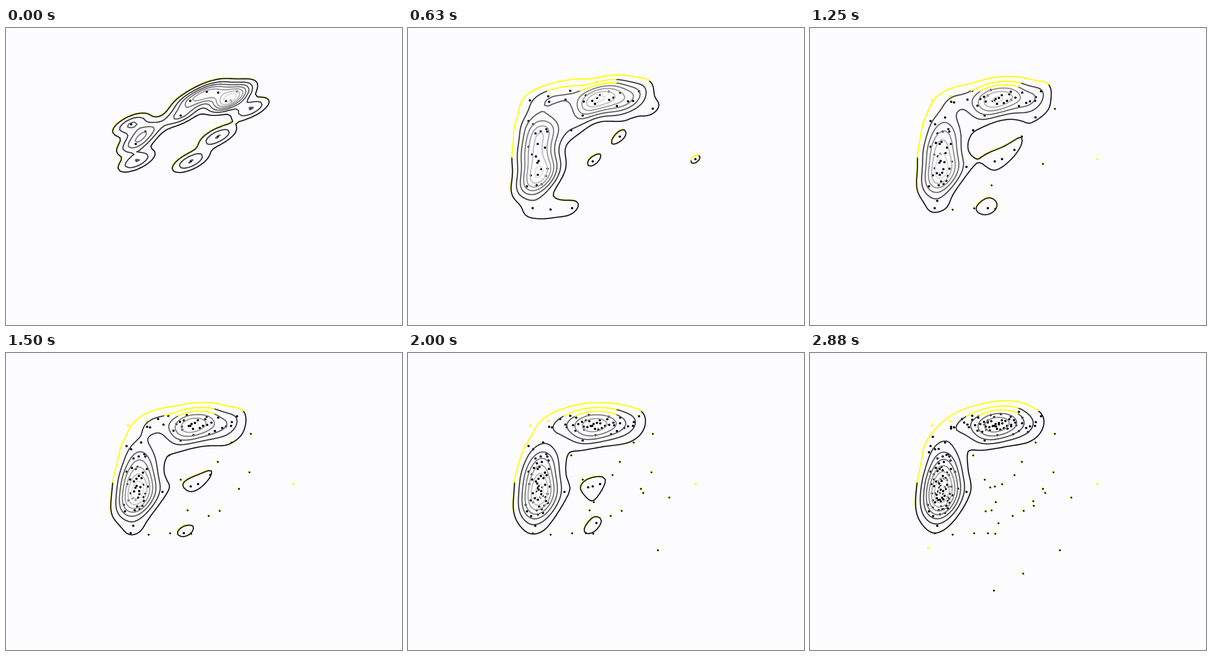
An HTML page with a canvas for the animation above (3010 ms loop, 864x648 px).

```html
<!DOCTYPE html>
<html lang="en">
<head>
<meta charset="utf-8">
<title>Growing density contours</title>
<style>
html, body { margin: 0; width: 100%; height: 100%; overflow: hidden; background: #fcfcff; }
canvas { display: block; width: 864px; height: 648px; }
</style>
</head>
<body>
<canvas id="stage" width="864" height="648"></canvas>
<script>
const ctx = document.getElementById('stage').getContext('2d');
const LOOP = 3010, STATES = 24, FIRST = 14, BATCH = 7;
const BANDWIDTH = 0.3, UNIT = 1.1e-6;
const X0 = 160, Y0 = 60, STEP = 6, COLS = 90, ROWS = 82;
const YELLOW = '#ffff00', BG = '#fcfcff';

// Key points in order of arrival: the opening set, then the scattered ones.
const keys = [
  [273, 210], [304, 226], [283, 253], [285, 290], [381, 191], [402, 159], [438, 139],
  [463, 141], [480, 160], [491, 159], [504, 138], [534, 176], [462, 237], [403, 291],
  [627, 286], [272, 393], [263, 203], [356, 223], [311, 396], [266, 158], [358, 393],
  [306, 149], [492, 195], [419, 286], [404, 394], [388, 393], [508, 296], [396, 343],
  [381, 276], [446, 266], [442, 355], [466, 344], [531, 260], [545, 430], [513, 305],
  [393, 293], [405, 325], [411, 371], [570, 315], [258, 425], [401, 518], [465, 481],
  [383, 345], [488, 333], [268, 183], [487, 323]
];

// Evenly spread sequence turned into a bell curve.
const bell = (i, ratio) => {
  const u = (0.5 + i * ratio) % 1;
  return 4.91 * (u ** 0.14 - (1 - u) ** 0.14);
};

// The i-th point of the two dense clusters: three of five go left.
function clusterPoint(i) {
  const a = bell(i + 1, 0.7549), b = bell(i + 1, 0.5698);
  return i * 3 % 5 < 3
    ? [288 + 15 * a, 298 + (b < 0 ? 46 : 34) * b]
    : [406 + 42 * a, 157 + 11 * b];
}

function pointsAt(k) {
  const extra = k && Math.min(Math.floor(1.5 * k + 1), keys.length - FIRST);
  const pts = keys.slice(0, FIRST + extra);
  for (let i = 0; i < BATCH * k - extra; i++) pts.push(clusterPoint(i));
  return pts;
}

// Gaussian kernels shaped by the covariance of the points.
function density(pts) {
  const n = pts.length;
  let mx = 0, my = 0, xx = 0, yy = 0, xy = 0;
  for (const [x, y] of pts) { mx += x / n; my += y / n; }
  for (const [x, y] of pts) {
    const dx = x - mx, dy = y - my;
    xx += dx * dx; yy += dy * dy; xy += dx * dy;
  }
  const scale = BANDWIDTH ** 2 / (n - 1);
  xx *= scale; yy *= scale; xy *= scale;
  const det = xx * yy - xy * xy;
  const peak = 1 / (2 * Math.PI * n * Math.sqrt(det));
  return Float64Array.from({ length: COLS * ROWS }, (_, i) => {
    const gx = X0 + (i % COLS) * STEP, gy = Y0 + Math.floor(i / COLS) * STEP;
    let sum = 0;
    for (const [x, y] of pts) {
      const dx = gx - x, dy = gy - y;
      const q = (dx * dx * yy - 2 * dx * dy * xy + dy * dy * xx) / det;
      if (q < 24) sum += Math.exp(-q / 2);
    }
    return sum * peak;
  });
}

// Marching squares; facing is high where open space lies to the upper left.
const corners = [[0, 0], [1, 0], [1, 1], [0, 1]];
function trace(grid, level) {
  const segs = [];
  for (let r = 0; r < ROWS - 1; r++) {
    for (let c = 0; c < COLS - 1; c++) {
      const v = corners.map(([x, y]) => grid[(r + y) * COLS + c + x]);
      const hits = [];
      for (let e = 0; e < 4; e++) {
        const f = (e + 1) % 4;
        if ((v[e] > level) === (v[f] > level)) continue;
        const t = (level - v[e]) / (v[f] - v[e]), a = corners[e], b = corners[f];
        hits.push({
          x: X0 + (c + a[0] + (b[0] - a[0]) * t) * STEP,
          y: Y0 + (r + a[1] + (b[1] - a[1]) * t) * STEP
        });
      }
      const gx = v[1] + v[2] - v[0] - v[3], gy = v[2] + v[3] - v[0] - v[1];
      const facing = (0.45 * gx + 0.9 * gy) / (Math.hypot(gx, gy) || 1);
      for (let h = 0; h + 1 < hits.length; h += 2) {
        segs.push({ a: hits[h], b: hits[h + 1], facing });
      }
    }
  }
  return segs;
}

// Level spacing shrinks while the first points arrive, then widens once.
const spacing = k => UNIT * (k < 9 ? Math.max(5, 10 - 2 * k) : 6);

function makeState(k) {
  const pts = pointsAt(k), grid = density(pts), step = spacing(k);
  const max = Math.max(...grid), lines = [];
  for (let i = 1; i * step < max; i++) {
    const g = Math.round(255 * i / Math.ceil(max / step));
    lines.push({ color: `rgb(${g},${g},${g})`, segs: trace(grid, i * step) });
  }
  const dots = pts.map(([x, y]) => {
    const i = Math.round((y - Y0) / STEP) * COLS + Math.round((x - X0) / STEP);
    return { x, y, loose: grid[i] < step };
  });
  return { lines, dots };
}
const states = Array.from({ length: STATES }, (_, k) => makeState(k));

function isYellow({ a: { x, y }, facing }, level, k) {
  if (k === 0 || level > 2) return false;
  if (level > 0) return facing > 0.6 && y < 136 && x < 460;
  return facing > 0.4 && (y < 150 || x > 600 || (x < 300 && y < 280));
}

function drawDot({ x, y, loose }, k) {
  const open = x > 600 || x + 2 * y < 615 || (x < 262 && y > 420);
  if (k > 5 && open) return disc(x, y, 2.5, YELLOW);
  if (k < 5 || !loose) return disc(x, y, 2.5, '#000');
  disc(x - 0.5, y - 0.6, 2.4, YELLOW);
  disc(x + 0.3, y + 0.5, 2, '#000');
}

function disc(x, y, r, color) {
  ctx.fillStyle = color;
  ctx.beginPath();
  ctx.arc(x, y, r, 0, 7);
  ctx.fill();
}

function stroke(segs, color, shift = 0) {
  ctx.strokeStyle = color;
  ctx.beginPath();
  for (const { a, b } of segs) {
    ctx.moveTo(a.x - shift, a.y - shift);
    ctx.lineTo(b.x - shift, b.y - shift);
  }
  ctx.stroke();
}

function draw(k) {
  const { lines, dots } = states[k];
  ctx.fillStyle = BG;
  ctx.fillRect(0, 0, 864, 648);
  dots.forEach(d => drawDot(d, k));
  ctx.lineCap = 'round';
  ctx.lineWidth = 2.6;
  lines.forEach(({ color, segs }, level) => {
    const bright = segs.filter(s => isYellow(s, level, k));
    const dark = segs.filter(s => !isYellow(s, level, k));
    if (level === 0) stroke(dark.filter(s => s.facing > 0.2), YELLOW, 0.9);
    stroke(dark, color);
    stroke(bright, YELLOW);
  });
}

let shown = -1;
const start = performance.now();
function tick() {
  const t = (performance.now() - start) % LOOP;
  const k = Math.min(STATES - 1, Math.floor(Math.floor(t / 10) / 12.5));
  if (k !== shown) draw(shown = k);
  requestAnimationFrame(tick);
}
draw(shown = 0);
requestAnimationFrame(tick);
</script>
</body>
</html>
```
